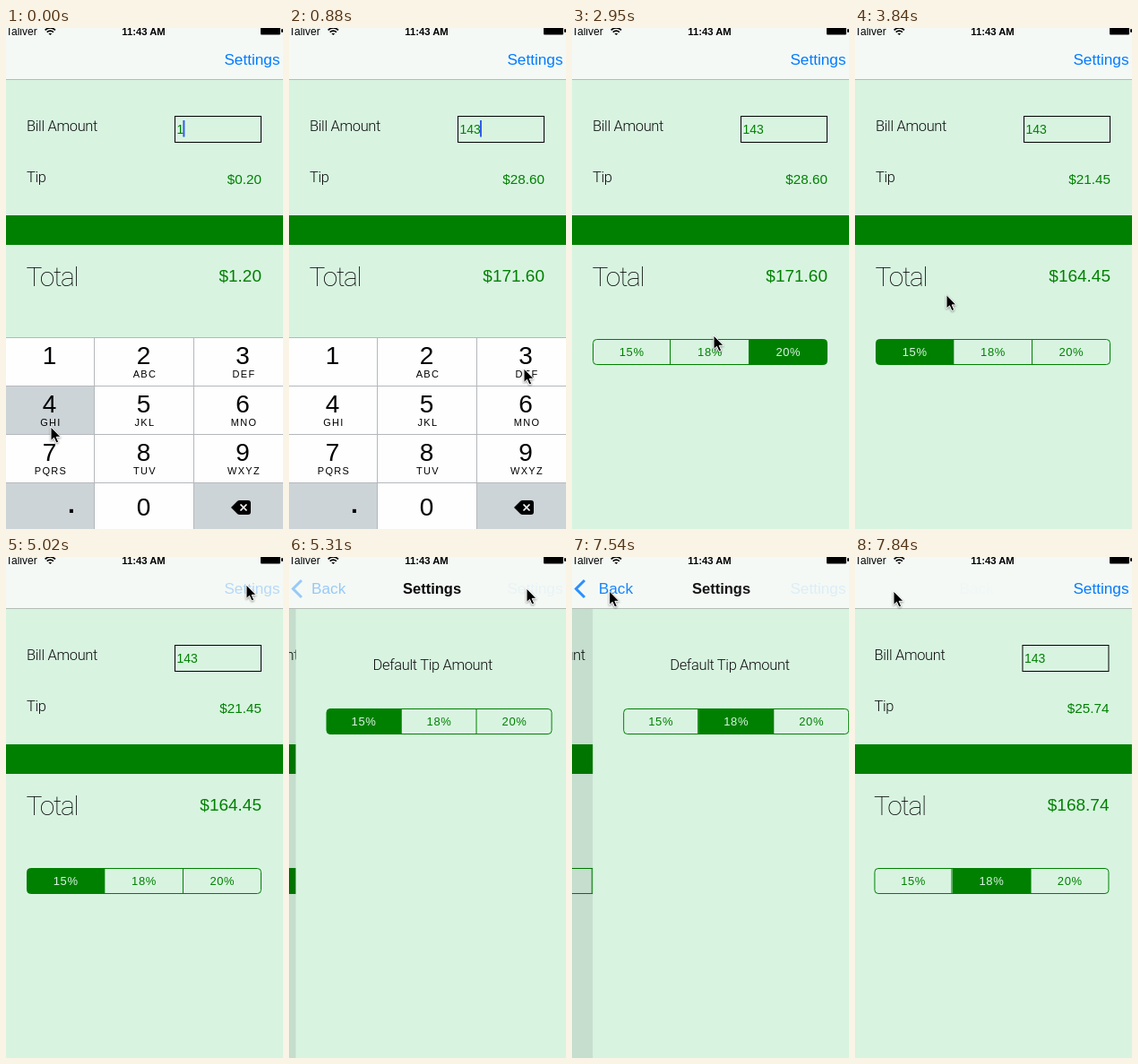
These frames come from a looping animation (309x559 px, 7990 ms). An HTML page:

```html
<!DOCTYPE html>
<html lang="en">
<head>
<meta charset="utf-8">
<title>Tip calculator</title>
<style>
  html, body { margin: 0; width: 100%; height: 100%; overflow: hidden; background: #d8f4e1; }
  svg { display: block; width: 100vw; height: 100vh; font-family: "Liberation Sans", Arial, sans-serif; }
  .bg { fill: #d8f4e1; }
  .green { fill: #008000; }
  .label { font: 300 16.5px Roboto, "Liberation Sans", sans-serif; letter-spacing: -.35px; fill: #111; }
  .big { font-size: 30px; font-weight: 200; letter-spacing: -1.3px; fill: #000; }
  .money { font-size: 15.3px; text-anchor: end; fill: #008000; }
  .sum { font-size: 19px; }
  .entry { font-size: 14px; fill: #008000; }
  .seg text { font-size: 13px; letter-spacing: .6px; text-anchor: middle; }
  .seg .frame { fill: none; stroke: #008000; }
  .blue { font-size: 17.2px; fill: #007aff; }
  .title { font-size: 16.5px; font-weight: bold; text-anchor: middle; }
  .status { font-size: 12px; }
  .digit { font-size: 28px; text-anchor: middle; }
  .letters { font-size: 11px; letter-spacing: 1.3px; text-anchor: middle; }
  .rule { stroke: #b4b8bb; fill: none; }
  #cursor { filter: drop-shadow(0 1px 1px rgba(0, 0, 0, .4)); }
</style>
</head>
<body>
<svg viewBox="0 0 309 559" preserveAspectRatio="none">
  <g id="main">
    <rect class="bg" x="-6" y="57" width="420" height="502"/>
    <text class="label" x="23" y="115">Bill Amount</text>
    <rect x="188.5" y="98.5" width="96" height="29" fill="none" stroke="#000"/>
    <text class="entry" id="entry" x="190.5" y="118"></text>
    <rect id="caret" y="103" width="2" height="18.5" fill="#2f5df0"/>
    <text class="label" x="23" y="172">Tip</text>
    <text class="money" id="tip" x="285" y="174"></text>
    <rect class="green" x="-6" y="209" width="420" height="33"/>
    <text class="label big" x="22.5" y="288">Total</text>
    <text class="money sum" id="total" x="285" y="283"></text>
    <g class="seg" id="mainSeg"></g>
  </g>
  <rect id="dim" y="57" width="309" height="502"/>
  <g id="prefs">
    <rect class="bg" x="-6" y="57" width="326" height="502"/>
    <text class="label" x="80" y="126">Default Tip Amount</text>
    <g class="seg" id="prefSeg"></g>
  </g>

  <rect width="309" height="57" fill="#f4f9f5"/>
  <path d="M0 57.5H309" stroke="#b3bdb6"/>
  <text class="status" x="0" y="8">Taliver</text>
  <g fill="none" stroke="#000" stroke-width="1.7">
    <path d="M43.6 2.4Q49.300 -2.600 55 2.400M45.700 4.700Q49.300 1.600 52.900 4.700"/>
    <path d="M47.300 6L49.300 8L51.300 6Z" fill="#000" stroke="none"/>
  </g>
  <text class="status" x="153.500" y="8" text-anchor="middle" style="font-size:11.300px;font-weight:bold">11:43 AM</text>
  <rect x="284" y="-2" width="22" height="9.500" rx="1"/>
  <rect x="307" y="1" width="2" height="4" rx="1"/>
  <text class="blue" id="settings" x="305.500" y="41" text-anchor="end">Settings</text>
  <text class="title" id="title" x="153.500" y="41">Settings</text>
  <path id="chevron" d="M14 26L4.500 35.500L14 45" fill="none" stroke="#007aff" stroke-width="3"/>
  <text class="blue" id="back" x="21" y="41">Back</text>

  <g id="pad"></g>

  <path id="cursor" d="M0 0V15.500L3.500 12.300L6 18L8.700 16.800L6.200 11.300H11Z" stroke="#fff" stroke-width="1"/>
</svg>

<script>
const LOOP = 7990, STEP = 147.9, LAST = 53;
const $ = id => document.getElementById(id);

function add(parent, tag, attrs, text) {
  const el = document.createElementNS('http://www.w3.org/2000/svg', tag);
  for (const name in attrs) el.setAttribute(name, attrs[name]);
  if (text) el.textContent = text;
  parent.append(el);
  return el;
}

// Segmented control; returns a function that sets how filled each segment is.
function makeSegments(group, x, y, width) {
  const w = width / 3, id = group.id + 'Clip';
  const box = { x: x + .5, y: y + .5, width: width - 1, height: 28, rx: 4 };
  add(add(group, 'clipPath', { id }), 'rect', box);
  const fills = add(group, 'g', { 'clip-path': `url(#${id})` });
  const cells = ['15%', '18%', '20%'].map((name, i) => ({
    fill: add(fills, 'rect', { class: 'green', x: x + i * w, y, width: w, height: 29 }),
    text: add(group, 'text', { x: x + (i + .5) * w, y: y + 19 }, name)
  }));
  add(group, 'rect', { ...box, class: 'frame' });
  for (const i of [1, 2]) {
    add(group, 'path', { class: 'frame', d: `M${Math.round(x + i * w) - .5} ${y}v29` });
  }
  return levels => cells.forEach((cell, i) => {
    cell.fill.setAttribute('fill-opacity', levels[i]);
    cell.text.setAttribute('fill', levels[i] > .5 ? '#d8f4e1' : '#008000');
  });
}

// Number pad
const pad = $('pad'), keys = {};
const edges = [-6, 98.5, 209.5, 315], centers = [48.5, 153.5, 264];
const names = ['', 'ABC', 'DEF', 'GHI', 'JKL', 'MNO', 'PQRS', 'TUV', 'WXYZ'];
const KEY = '#fefefe', GREY = '#cdd4d8';

function addKey(col, row, fill) {
  return add(pad, 'rect', {
    x: edges[col], y: 345 + row * 54, width: edges[col + 1] - edges[col], height: 54, fill
  });
}
names.forEach((letters, i) => {
  const col = i % 3, row = Math.floor(i / 3), x = centers[col], y = 345 + row * 54;
  keys[i + 1] = addKey(col, row, KEY);
  add(pad, 'text', { class: 'digit', x, y: y + 30 }, String(i + 1));
  add(pad, 'text', { class: 'letters', x: x + 1.5, y: y + 45 }, letters);
});
[GREY, KEY, GREY].forEach((fill, col) => addKey(col, 3, fill));
add(pad, 'text', { class: 'digit', x: 73, y: 541, 'font-weight': 'bold' }, '.');
add(pad, 'text', { class: 'digit', x: 153.5, y: 544 }, '0');
add(pad, 'path', { d: 'M251 535L258 528Q259 527 260.500 527H270Q273 527 273 530V540Q273 543 270 543H260.500Q259 543 258 542Z' });
add(pad, 'path', { d: 'M261.500 531.500l7 7m0-7l-7 7', stroke: '#fff', 'stroke-width': 1.7 });
add(pad, 'path', { class: 'rule', d: 'M98.500 345V561M209.500 345V561M0 345.500H309M0 399.500H309M0 453.500H309M0 507.500H309' });

const setMain = makeSegments($('mainSeg'), 23, 347, 262);
const setPref = makeSegments($('prefSeg'), 28, 169, 252);

// Pointer stops: step, x, y
const path = [
  [0, 50, 445], [1, 50, 444], [5, 262, 383], [6, 262, 380], [8, 231, 287], [9, 208, 277],
  [13, 141, 268], [17, 141, 268], [20, 158, 343], [22, 70, 357], [25, 66, 359],
  [30, 246, 52], [33, 268, 31], [35, 268, 31], [36, 265, 35], [38, 198, 159],
  [39, 158, 186], [44, 158, 186], [45, 120, 144], [48, 44, 42], [50, 41, 38], [53, 43, 38]
];

function pointer(k) {
  const i = Math.max(1, path.findIndex(p => p[0] >= k));
  const [k0, x0, y0] = path[i - 1], [k1, x1, y1] = path[i];
  const f = (k - k0) / (k1 - k0);
  return [x0 + (x1 - x0) * f, y0 + (y1 - y0) * f];
}

// Critically damped spring from 0 to 1
function spring(k, start) {
  const x = Math.max(0, k - start) * 2.795;
  return 1 - (1 + x) * Math.exp(-x);
}

// Tap on a segment: tint, cross-fade, filled
const tapped = (k, start) => k < start ? 0 : [.15, .7][k - start] ?? 1;
const released = level => level > .15 ? 1 - level : 1;

const move = (el, x, y = 0) => el.setAttribute('transform', `translate(${x} ${y})`);
const fade = (el, a) => el.setAttribute('opacity', a);
const dollars = v => '$' + v.toFixed(2);

function render(k) {
  const pop = k >= 51;

  // Amounts
  const bill = k < 1 ? '1' : k < 6 ? '14' : '143';
  const rate = k < 24 ? .2 : pop ? .18 : .15;
  $('entry').textContent = bill;
  $('tip').textContent = dollars(bill * rate);
  $('total').textContent = dollars(bill * (1 + rate));
  $('caret').setAttribute('x', 189.6 + bill.length * 7.8);
  fade($('caret'), k < 16 && !(k > 10 && k < 14) ? 1 : 0);

  // Keyboard
  keys[4].setAttribute('fill', k === 0 ? GREY : KEY);
  keys[3].setAttribute('fill', k === 5 ? GREY : KEY);
  move(pad, 0, 216 * spring(k, 15.8));

  // Segments
  const a = tapped(k, 23), b = tapped(k, 41);
  setMain(pop ? [0, 1, 0] : [a, 0, released(a)]);
  setPref([released(b), b, 0]);

  // Screen change
  const shown = spring(k, 34.23) - spring(k, 50.82);
  move($('main'), -96 * shown);
  move($('prefs'), 320 * (1 - shown));
  fade($('dim'), .1 * shown);

  // Bar items
  const backIn = Math.min(1, Math.max(0, (k - 35.4) / 1.6));
  const backAlpha = k === 50 ? .25 : pop ? shown : backIn;
  move($('title'), 143 * (1 - shown));
  fade($('title'), shown);
  move($('back'), 97 * (1 - shown));
  fade($('back'), backAlpha);
  fade($('chevron'), pop ? shown * shown : backAlpha);
  fade($('settings'), k === 34 ? .25 : 1 - shown);

  move($('cursor'), ...pointer(k));
}

let current = -1;
function tick(now) {
  const t = now % LOOP;
  const k = Math.min(LAST, Math.floor((t + 20) / STEP));
  if (k !== current) render(current = k);
  requestAnimationFrame(tick);
}
render(0);
requestAnimationFrame(tick);
</script>
</body>
</html>
```
